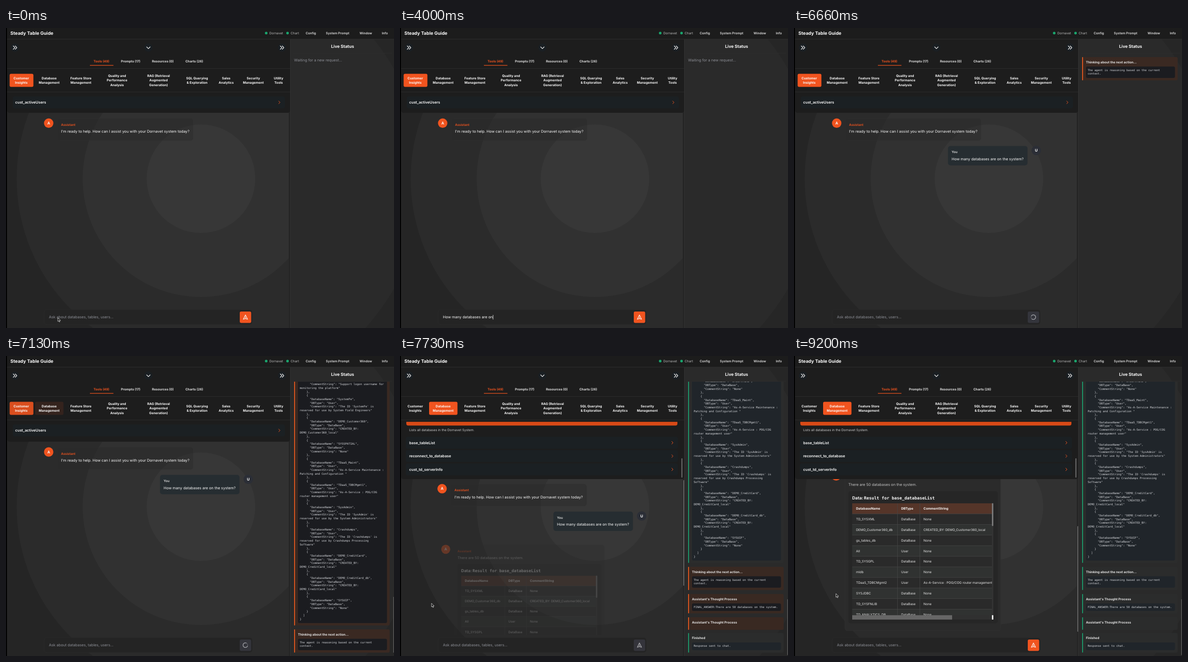
These frames come from a looping animation (800 by 619 pixels, 9260 ms). An HTML page:

```html
<!DOCTYPE html>
<html lang="en">
<head>
<meta charset="utf-8">
<title>Steady Table Guide</title>
<style>
html, body { margin: 0; width: 100%; height: 100%; overflow: hidden; background: #000; }
svg { display: block; width: 800px; height: 619px; }
text { font-family: Inter, "Liberation Sans", sans-serif; white-space: pre; text-rendering: geometricPrecision; }
text.mono { font-family: "DejaVu Sans Mono", "Liberation Mono", monospace; }
</style>
</head>
<body>
<svg id="stage" viewBox="0 0 800 619"></svg>
<script>
const LOOP = 9260, ORANGE = '#f1541f', GREEN = '#1c9468', WHITE = '#fafafa';
const stage = document.getElementById('stage');

// Drawing helpers
function el(tag, attrs, parent = stage) {
  const node = document.createElementNS(stage.namespaceURI, tag);
  set(node, attrs);
  parent.append(node);
  return node;
}
function set(node, attrs) {
  for (const key in attrs) node.setAttribute(key, attrs[key]);
}
const group = (parent, attrs = {}) => el('g', attrs, parent);
const box = (g, x, y, x2, y2, fill, rx = 0, more = {}) =>
  el('rect', { x, y, width: x2 - x, height: y2 - y, fill, rx, ...more }, g);
const disc = (g, cx, cy, r, fill) => el('circle', { cx, cy, r, fill }, g);
const stroke = (g, d, color, width = 1) => el('path', {
  d, fill: 'none', stroke: color, 'stroke-width': width,
  'stroke-linecap': 'round', 'stroke-linejoin': 'round' }, g);
function label(g, x, y, str, size, fill = WHITE, weight = 400, more = {}) {
  const node = el('text', { x, y: y + size * 0.35, 'font-size': size, fill, 'font-weight': weight, ...more }, g);
  node.textContent = str;
  return node;
}
const mono = (g, x, y, str, size = 5.775, fill = '#d6d8dc', weight = 400) =>
  label(g, x, y, str, size, fill, weight, { class: 'mono' });
const defs = el('defs', {});
function clip(id, x, y, x2, y2) {
  return box(el('clipPath', { id }, defs), x, y, x2, y2, '#fff');
}
const show = (node, on) => node.setAttribute('display', on ? 'inline' : 'none');
const fade = (node, o) => node.setAttribute('opacity', o);

// Timing helpers
const span = (t, a, b) => Math.min(1, Math.max(0, (t - a) / (b - a)));
const inOut = p => p < 0.5 ? 4 * p ** 3 : 1 - (2 - 2 * p) ** 3 / 2;
const out = p => 1 - (1 - p) ** 5;
const scaleAt = (cx, cy, s) => `translate(${cx} ${cy}) scale(${s}) translate(${-cx} ${-cy})`;

// Backdrop
clip('left', 2, 23, 583, 619);
const chatClip = clip('chat', 2, 175, 586, 576);
const listClip = clip('list', 2, 133, 586, 175);
clip('status', 587, 53, 800, 614);
clip('right', 587, 23, 800, 619);
box(stage, 2, 0, 800, 619, '#252525');
const rings = group(stage, { 'clip-path': 'url(#left)' });
[[380, '#2b2b2b'], [244, '#313131'], [112, '#373737']].forEach(([r, c]) => disc(rings, 402, 311, r, c));
const side = group(stage, { 'clip-path': 'url(#right)' });
box(side, 586, 23, 800, 619, '#262626');
disc(side, 402, 311, 458, '#2a2a2a');
box(stage, 586, 23, 587, 619, '#333');

// Chat
const chatArea = group(stage, { 'clip-path': 'url(#chat)' });
const chat = group(chatArea);

function avatar(g, x, y, letter, fill) {
  disc(g, x, y, 9.7, fill);
  label(g, x, y, letter, 7.66, WHITE, 700, { 'text-anchor': 'middle' });
}
avatar(chat, 88, 196.3, 'A', ORANGE);
box(chat, 105.5, 187, 385.5, 232, '#2a2a2a', 5, { 'fill-opacity': 0.4, stroke: '#303030', 'stroke-width': 0.6 });
label(chat, 113.5, 199.5, 'Assistant', 6.56, ORANGE, 600);
label(chat, 113.5, 213.8, "I'm ready to help. How can I assist you with your Dornavet system today?", 7.66);

const ask = 'How many databases are on the system?';
const userMsg = group(chat);
box(userMsg, 317.5, 243.5, 481.5, 283.5, '#262d31', 5);
label(userMsg, 325, 256, 'You', 6.56, '#e6e6e6', 600);
label(userMsg, 325, 270.3, ask, 7.66);
avatar(userMsg, 499.5, 252.6, 'U', '#2b2e36');

const answer = group(chat);
avatar(answer, 87, 247.5, 'A', ORANGE);
box(answer, 105, 238, 426, 567, '#2b2b2b', 5, { stroke: '#333', 'stroke-width': 0.6 });
label(answer, 112, 251.5, 'Assistant', 6.56, ORANGE, 600);
label(answer, 112, 265.3, 'There are 50 databases on the system.', 7.66, '#c4c4c4');
box(answer, 112, 279, 420, 552, '#262626', 5);
label(answer, 120, 293.5, 'Data: ', 8.75, WHITE, 700);
mono(answer, 144.3, 293.5, 'Result for base_databaseList', 8.66, WHITE, 700);

clip('table', 120, 304, 409, 535.5);
const table = group(answer, { 'clip-path': 'url(#table)' });
const rowH = 21.85, cols = [128, 221, 267];
const rows = [
  ['TD_SYSXML', 'DataBase', 'None'],
  ['DEMO_Customer360_db', 'DataBase', 'CREATED_BY: DEMO_Customer360_local'],
  ['gs_tables_db', 'DataBase', 'None'],
  ['All', 'User', 'None'],
  ['TD_SYSGPL', 'DataBase', 'None'],
  ['mldb', 'User', 'None'],
  ['TDaaS_TDBCMgmt2', 'User', 'As-A-Service : POG/COG router management user'],
  ['SYSJDBC', 'DataBase', 'None'],
  ['TD_SYSFNLIB', 'DataBase', 'None'],
  ['TD_ANALYTICS_DB', 'DataBase', 'None']
];
box(table, 120, 304, 411, 536, '#2a2a2a');
box(table, 120, 304, 411, 326, '#553529');
['DatabaseName', 'DBType', 'CommentString'].forEach((s, i) => label(table, cols[i], 315, s, 6.65, WHITE, 700));
rows.forEach((row, i) => {
  const y = 326 + i * rowH;
  if (i % 2) box(table, 120, y, 411, y + rowH, '#303231');
  box(table, 120, y - 0.4, 411, y + 0.4, '#464646');
  row.forEach((s, c) => label(table, cols[c], y + 10.9, s, 6.6, '#ececec'));
});
[213, 259].forEach(x => box(table, x, 304, x + 0.8, 536, '#464646'));
box(answer, 120, 535, 408, 544, '#303030');
box(answer, 120, 535, 326, 544, '#666');
box(answer, 408, 304, 411, 535, '#333');
box(answer, 408, 304, 411, 351, '#777', 1);
box(answer, 408, 535, 411, 544, '#f5f5f5');
const chatBar = box(chatArea, 584, 256, 586.5, 474, '#606060', 1.2);

// Tool panel
const panel = el('path', { fill: '#1d1d1d' });
[18.5, 293.5, 569].forEach(x => disc(stage, x, 40.5, 8.5, '#1a1f23'));
const doubleArrow = x => `M${x - 3.6} 37l3.5 3.5-3.5 3.5M${x + 0.4} 37l3.5 3.5-3.5 3.5`;
stroke(stage, doubleArrow(18.5), WHITE, 1.1);
stroke(stage, doubleArrow(569), WHITE, 1.1);
stroke(stage, 'M290 39l3.6 3.6 3.6-3.6', WHITE, 1.1);
[[180.5, 'Tools (49)'], [237, 'Prompts (17)'], [301, 'Resources (0)'], [370, 'Charts (26)']]
  .forEach(([x, s], i) => label(stage, x, 68.7, s, 6.56, i ? '#e2e2e2' : ORANGE, 700));
box(stage, 173, 76.5, 221.5, 77.7, ORANGE);
box(stage, 2, 83.3, 586, 84.1, '#303030');
box(stage, 2, 131.6, 586, 132.4, '#303030');

const firstTab = box(stage, 7.5, 94.5, 56.5, 121.5, ORANGE, 3);
const secondTab = box(stage, 60, 94.5, 118.5, 121.5, ORANGE, 3);
[[31.5, 'Customer|Insights'], [89, 'Database|Management'], [154.5, 'Feature Store|Management'],
 [229, 'Quality and|Performance|Analysis'], [314.5, 'RAG (Retrieval|Augmented|Generation)'],
 [394, 'SQL Querying|& Exploration'], [454, 'Sales|Analytics'], [510, 'Security|Management'],
 [562, 'Utility|Tools']].forEach(([x, str]) => {
  const lines = str.split('|');
  lines.forEach((s, i) => label(stage, x, 108 + (i - (lines.length - 1) / 2) * 9.6, s, 6.65, WHITE, 700,
    { 'text-anchor': 'middle' }));
});

const list = group(stage, { 'clip-path': 'url(#list)' });
function tool(g, y, name, x = 12) {
  box(g, x, y - 12.3, x + 561, y + 12.3, '#1b2023', 4);
  label(g, 19, y, name, 7.66, '#fff', 600);
  stroke(g, `M${x + 548.2} ${y - 2.8}l2.8 2.8-2.8 2.8`, ORANGE);
}
const listA = group(list), listB = group(list);
tool(listA, 153.5, 'cust_activeUsers', 14);
box(listB, 13, 128, 572, 143.5, '#d84a17', 4);
box(listB, 13, 128, 572, 135.8, '#1d1d1d');
label(listB, 19, 152.6, 'Lists all databases in the Dornavet System.', 6.65, '#cfcfcf');
['base_tableList', 'reconnect_to_database', 'cust_td_serverInfo'].forEach((s, i) => tool(listB, 179 + i * 27.5, s));
box(listB, 580, 211, 582.5, 251, '#606060', 1.2);

// Header
box(stage, 2, 0, 800, 23, '#1c1c1c');
box(stage, 2, 22.6, 800, 23.4, '#323232');
label(stage, 9, 10.6, 'Steady Table Guide', 9.4, WHITE, 700);
[[536.5, 'Dornavet'], [580.5, 'Chart']].forEach(([x, s]) => {
  disc(stage, x, 10.5, 2.7, '#1aa36c');
  label(stage, x + 6.5, 10.6, s, 6.56, '#bdbdbd');
});
[[618, 'Config'], [659.5, 'System Prompt'], [729, 'Window'], [775, 'Info']]
  .forEach(([x, s]) => label(stage, x, 10.6, s, 6.56, '#e4e4e4', 600));

// Live status
label(stage, 694, 37.6, 'Live Status', 8.75, WHITE, 700, { 'text-anchor': 'middle' });
box(stage, 592, 51.7, 795, 52.3, '#303030');
const waiting = label(stage, 594, 66, 'Waiting for a new request...', 7.66, '#8d8f96');
const status = group(stage, { 'clip-path': 'url(#status)' });
const feed = group(status);

// A card glows orange while active, then settles to green
function card(g, y, y2, title, lines = [], inset = 19.5) {
  const c = group(g), cold = group(c);
  c.hot = group(c);
  [[cold, '#2b2c2c', GREEN, '#20252a'], [c.hot, '#3a2922', '#d9541f', '#1b1c20']].forEach(([layer, fill, edge, well]) => {
    box(layer, 594, y, 791, y2, fill, 3);
    box(layer, 594, y, 596, y2, edge, 1);
    if (lines.length) box(layer, 602, y + inset, 785.5, y2 - 5, well, 3);
  });
  label(c, 602, y + 10.4, title, 6.6, '#e6e6e6', 700);
  return c;
}
const note = (y, y2, title, ...lines) => {
  const c = card(feed, y, y2, title, lines);
  lines.forEach((s, i) => mono(c, 605.5, y + 26.7 + i * 7.7, s));
  return c;
};

const dbs = [
  ['Support', 'User', 'Support logon username for', 'monitoring the platform'],
  ['SystemFe', 'User', "The ID 'SystemFe' is", 'reserved for use by System Field Engineers'],
  ['DEMO_Customer360', 'DataBase', 'CREATED_BY:', 'DEMO_Customer360_local'],
  ['SYSSPATIAL', 'DataBase', 'None'],
  ['TDaaS_Maint', 'User', 'As-A-Service Maintenance :', 'Patching and Configuration '],
  ['TDaaS_TDBCMgmt1', 'User', 'As-A-Service : POG/COG', 'router management user'],
  ['SysAdmin', 'User', "The ID 'SysAdmin' is", 'reserved for use by the System Administrators'],
  ['Crashdumps', 'User', "The ID 'Crashdumps' is", 'reserved for use by Crashdumps Processing', 'Software'],
  ['DEMO_CreditCard', 'DataBase', 'CREATED_BY:', 'DEMO_CreditCard_local'],
  ['DEMO_CreditCard_db', 'DataBase', 'CREATED_BY:', 'DEMO_CreditCard_local'],
  ['SYSUIF', 'DataBase', 'None']
];
const json = dbs.flatMap(([name, type, ...text], i) => [
  '    {',
  `      "DatabaseName": "${name}",`,
  `      "DBType": "${type}",`,
  ...(`      "CommentString": "` + text.join('\n') + '"').split('\n'),
  i < dbs.length - 1 ? '    },' : '    }'
]).concat('  ]', '}');

const result = card(feed, 20, 556, '', json, 0);
json.forEach((s, i) => mono(result, 605.5, 542.6 - (json.length - 1 - i) * 7.69, s));
const think = note(564, 612, 'Thinking about the next action...',
  'The agent is reasoning based on the current', 'context.');
const thought = note(620, 660, "Assistant's Thought Process", 'FINAL_ANSWER:There are 50 databases on the system.');
const thought2 = note(668, 694, "Assistant's Thought Process");
const done = note(700.5, 741, 'Finished', 'Response sent to chat.');
show(done.hot, false);
const feedBar = box(stage, 798.4, 497, 800, 612, '#555');

// Input row
box(stage, 79, 581, 508, 612, '#242424', 5, { stroke: '#2d2d2d', 'stroke-width': 0.7 });
const hint = label(stage, 88.5, 596.8, 'Ask about databases, tables, users...', 7.66, '#8d8f96');
const typed = label(stage, 88.5, 596.8, '', 7.66);
const caret = box(stage, 0, 592, 0.8, 601.5, WHITE);
box(stage, 482, 585, 505.5, 608.5, '#34353c', 3);
const send = box(stage, 482, 585, 505.5, 608.5, ORANGE, 3);
const arrow = stroke(stage, 'M493.7 592l4.4 9-4.4-1.5-4.4 1.5zM493.7 596v3.4', WHITE, 1.1);
const spinner = group(stage);
el('circle', { cx: 493.5, cy: 596.6, r: 4.8, fill: 'none', stroke: '#5a5b62', 'stroke-width': 1.3 }, spinner);
stroke(spinner, 'M498.3 596.6a4.8 4.8 0 1 1-4.8-4.8', '#a2a3a8', 1.3);

const pointer = el('path', { d: 'M0 0v7.4l1.7-1.5 1.2 2.7 1.3-.6-1.2-2.6h2.4z',
  fill: '#111', stroke: '#fff', 'stroke-width': 0.7 });

// Moment at which each character is typed
const keys = [
  600, 730, 800, 930, 1060, 1200, 1330, 1460, 1660, 1800, 1860, 1930, 2000, 2130, 2200, 2330, 2460, 2530,
  3000, 3130, 3200, 3330, 3530, 3730, 4000, 4130, 4330, 4400, 4400, 4730, 4930, 5060, 5200, 5400, 5530, 5660, 5860
];
const SENT = 6060, REPLY = 7600;

function draw(t) {
  const sent = t >= SENT, replied = t >= REPLY;

  const count = sent ? 0 : keys.filter(k => k <= t).length;
  typed.textContent = ask.slice(0, count);
  show(hint, !count);
  show(caret, count);
  if (count) set(caret, { x: 88.7 + typed.getComputedTextLength() });

  fade(send, sent ? span(t, 7730, 7930) : 1);
  show(spinner, sent && !replied);
  show(arrow, !sent || replied);
  fade(arrow, replied ? 0.65 + 0.35 * span(t, 7730, 7930) : 1);
  set(spinner, { transform: `rotate(${(t - SENT) * 0.36} 493.5 596.6)` });

  // The panel grows and pushes the chat down
  const open = inOut(span(t, 7060, 7460)), grow = 77.5 * open, bottom = 175 + 79 * open;
  const scroll = 146 * out(span(t, 7760, 8180));
  set(panel, { d: `M2 23H586V${bottom - 6}q0 6-6 6H8q-6 0-6-6z` });
  set(listClip, { height: bottom - 135 });
  set(chatClip, { y: bottom - 6, height: 582 - bottom });
  set(chat, { transform: `translate(${replied ? -1.2 : 0} ${grow - scroll})` });
  set(chatBar, { y: 256 + 95 * scroll / 146 });
  show(chatBar, replied);

  const swap = span(t, 7110, 7310);
  fade(firstTab, 1 - swap);
  fade(secondTab, swap);
  show(listA, swap < 0.5);
  show(listB, swap >= 0.5);

  const u = span(t, SENT, 6330);
  fade(userMsg, u);
  set(userMsg, { transform: scaleAt(292, 263, 0.95 + 0.05 * u) });
  const a = span(t, 7650, 7930);
  fade(answer, a);
  set(answer, { transform: 'translate(1.2 68.3) ' + scaleAt(292, 403, 0.95 + 0.05 * a) });

  // Status feed: each new card pushes the others up
  show(waiting, !sent);
  const loaded = t >= 6730;
  show(result, loaded);
  fade(think, span(t, 6200, 6330));
  [[thought, 7330], [thought2, 7460], [done, REPLY]].forEach(([c, at]) => fade(c, span(t, at - 1, at + 130)));
  const lift = !loaded ? 504 : t < 7330 ? 0 : t < 7460 ? 48 : t < REPLY ? 82 : 129;
  set(feed, { transform: `translate(0 ${-lift})` });
  fade(result.hot, 1 - span(t, 7130, 7330));
  [think, thought, thought2].forEach(c => fade(c.hot, 1 - span(t, 7730, 8000)));
  show(feedBar, loaded);
  set(feedBar, { y: replied ? 502 : 497 });

  const m = inOut(span(t, 7730, 8000));
  show(pointer, t < 600 || replied);
  set(pointer, { transform: t < 600 ? 'translate(107 598)' : `translate(${65 + 21.5 * m} ${510.3 - 20 * m})` });
}

const start = performance.now();
function tick() {
  draw((performance.now() - start) % LOOP);
  requestAnimationFrame(tick);
}
tick();
</script>
</body>
</html>
```
